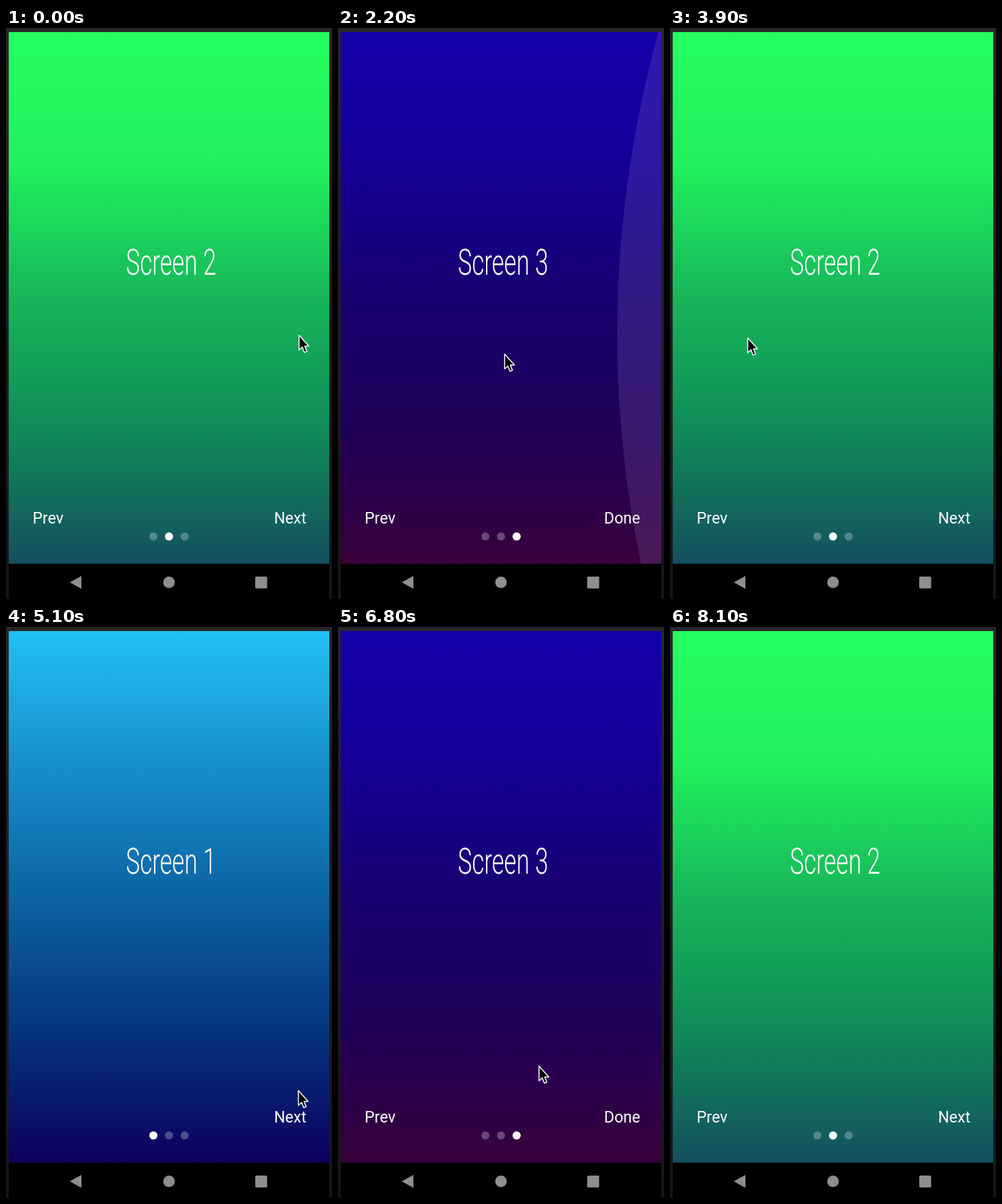
Write an HTML page that moves like this. It is 480 by 840 pixels and loops after 8200 ms.

```html
<!DOCTYPE html>
<html lang="en">
<head>
<meta charset="utf-8">
<title>Intro screens</title>
<style>
  html, body { margin: 0; width: 100%; height: 100%; overflow: hidden; background: #1e1d20; }
  svg { display: block; width: 480px; height: 840px; }
  text { fill: #fff; font-family: Roboto, sans-serif; }
  .title { font-size: 54.5px; font-weight: 300; }
  .button { font-size: 23px; text-anchor: middle; }
</style>
</head>
<body>
<svg viewBox="0 0 480 840" xmlns="http://www.w3.org/2000/svg">
  <defs>
    <clipPath id="view"><rect x="4" y="6" width="472" height="782"/></clipPath>
    <linearGradient id="bezel" x2="0" y2="1">
      <stop stop-color="#29272a"/><stop offset="1" stop-color="#161517"/>
    </linearGradient>
  </defs>
  <rect width="480" height="840" fill="url(#bezel)"/>
  <g clip-path="url(#view)">
    <g id="pages"></g>
    <path id="glow" fill="rgb(170,150,220)"/>
  </g>
  <g id="dots" fill="#fff"></g>
  <rect x="4" y="788" width="472" height="52"/>
  <g fill="#8f8f92">
    <path d="M94 815.5L111 806V825Z"/>
    <circle cx="240" cy="815.5" r="8.5"/>
    <rect x="367" y="807" width="17.5" height="17.5" rx="1.5"/>
  </g>
  <path id="cursor" d="M.5 1V22.7L5.2 18.4L8.4 26.2L12 24.6L8.9 17H14.9Z"
        stroke="#fff" stroke-width="1.5" stroke-linejoin="round"/>
</svg>
<script>
const LOOP = 8200, STEP = 100, PAGE_W = 472, SETTLE = 400;
const $ = id => document.getElementById(id);
const clamp = (v, lo = 0, hi = 1) => Math.min(hi, Math.max(lo, v));
const mix = (a, b, k) => a + (b - a) * k;
const smooth = k => k * k * (3 - 2 * k);
const flick = k => k ** 3;
const settle = k => 1 - (1 - k) ** 4;

// colours are spread evenly from top to bottom
const screens = [
  { right: 'Next', colors: ['#22c0f4', '#1790cc', '#0c63a3', '#06357c', '#0c005f'] },
  { left: 'Prev', right: 'Next', colors: ['#24ff60', '#20f15c', '#17b65a', '#108b58', '#144f5f'] },
  { left: 'Prev', right: 'Done', colors: ['#1400aa', '#140096', '#180070', '#200058', '#38003c'] }
];
const LAST = screens.length - 1, FIRST_SHOWN = 1;

// pointer actions; turn is the number of screens to advance
const drag = (start, end, from, to, turn) => ({ start, end, from, to, turn, pulls: true });
const click = (start, at, turn) => ({ start, end: start, from: at, to: at, turn });
const hover = (start, at) => click(start, at, 0);
const next = [411, 721];
const actions = [
  drag(0, 600, [431, 451], [170, 465], 1),
  drag(1800, 2300, [400, 478], [97, 479], 1),
  drag(2800, 3300, [100, 480], [420, 470], -1),
  drag(3900, 4400, [114, 455], [400, 470], -1),
  hover(5100, [430, 681]),
  click(5300, next, 1),
  click(6200, next, 1),
  drag(7500, 7800, [150, 549], [375, 540], -1),
  hover(8000, [500, 530])
];

function pointerAt(t) {
  const i = actions.findLastIndex(a => a.start <= t), a = actions[i];
  if (t < a.end) {
    const k = (t - a.start) / (a.end - a.start);
    return [mix(a.from[0], a.to[0], flick(k)), mix(a.from[1], a.to[1], k)];
  }
  const b = actions[i + 1] || { start: LOOP, from: a.to };
  const k = smooth((t - a.end) / (b.start - a.end));
  return a.to.map((v, n) => mix(v, b.from[n], k));
}

function stateAt(t) {
  let page = FIRST_SHOWN, pos = page, glow = 0;
  for (const a of actions) {
    if (a.start > t) break;
    const x = pointerAt(Math.min(t, a.end))[0];
    const pull = a.pulls ? (a.from[0] - x) / PAGE_W : 0;
    const rest = clamp((t - a.end) / SETTLE);
    if (page + pull > LAST) glow = clamp(pull * 3.05) * (1 - rest);
    pos = clamp(page + pull, 0, LAST);
    if (t >= a.end) {
      page = clamp(page + a.turn, 0, LAST);
      pos = mix(pos, page, settle(rest));
    }
  }
  return { page, pos, glow };
}

$('pages').innerHTML = screens.map((s, i) => {
  const stops = s.colors.map((c, n) => `<stop offset="${n / (s.colors.length - 1)}" stop-color="${c}"/>`).join('');
  const button = (x, label) => label ? `<text class="button" x="${x}" y="728.5">${label}</text>` : '';
  return `<g><linearGradient id="bg${i}" x2="0" y2="1">${stops}</linearGradient>
    <rect x="4" y="6" width="${PAGE_W}" height="782" fill="url(#bg${i})"/>
    <text class="title" transform="translate(176.5 363) scale(.64 1)">Screen ${i + 1}</text>
    ${button(62, s.left)}${button(418.4, s.right)}</g>`;
}).join('');
$('dots').innerHTML = screens.map((s, i) => `<circle cx="${217 + 23 * i}" cy="748" r="6"/>`).join('');

const pages = [...$('pages').children], dots = [...$('dots').children];

function draw(t) {
  const { page, pos, glow } = stateAt(t);
  pages.forEach((p, i) => p.setAttribute('transform', `translate(${(i - pos) * PAGE_W} 0)`));
  dots.forEach((d, i) => d.setAttribute('opacity', i === page ? 1 : .27));

  const depth = 65 * glow, half = 460 * Math.sqrt(glow);
  $('glow').setAttribute('d', `M476 ${450 - half}Q${476 - 2 * depth} 450 476 ${450 + half}Z`);
  $('glow').setAttribute('opacity', .17 * clamp(glow * 1.5));
  $('cursor').setAttribute('transform', `translate(${pointerAt(t)})`);
}

const start = performance.now();
function tick() {
  const t = (performance.now() - start) % LOOP;
  draw(Math.floor(t / STEP) * STEP);
  requestAnimationFrame(tick);
}
tick();
</script>
</body>
</html>
```
